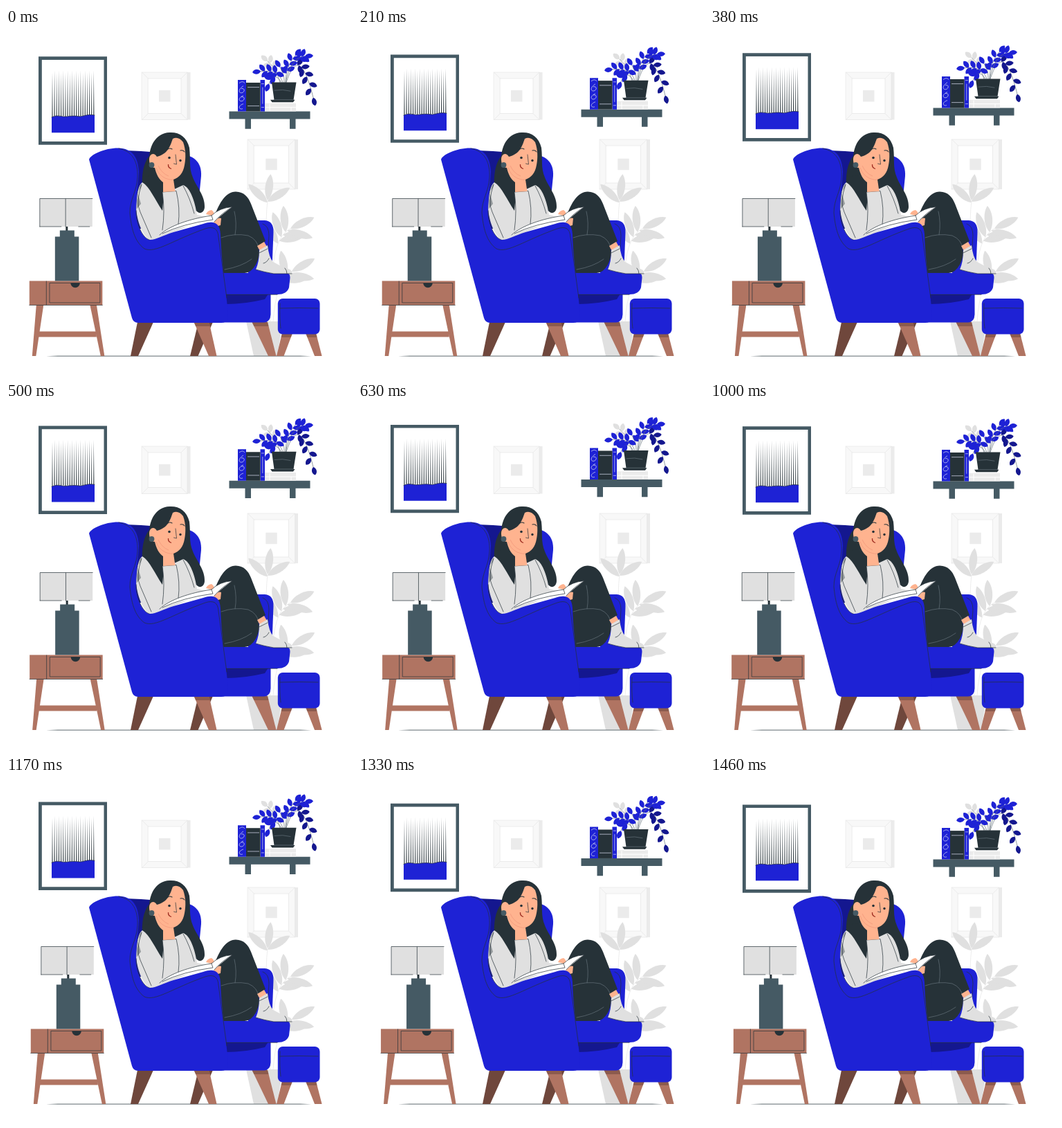
An HTML page for the animation above (1500 ms loop, 500 by 500 pixels).

```html
<!DOCTYPE html>
<html lang="en">
<head>
<meta charset="utf-8">
<title>Reading corner</title>
<style>
  html, body { margin: 0; height: 100%; overflow: hidden; background: #fff; }
  svg { display: block; width: 100vw; height: 100vh; }
  .blue { fill: #1e22d5; } .navy { fill: #14178f; }
  .dark { fill: #263238; } .slate { fill: #455a64; }
  .wood { fill: #b07462; } .shade { fill: #6f473c; }
  .skin { fill: #ffb38f; } .gray { fill: #e0e0e0; }
  .pale { fill: #f8f8f8; } .mist { fill: #ebebeb; } .white { fill: #fff; }
  .line, .soft, .trim { fill: none; stroke: #263238; stroke-width: .7; stroke-linecap: round; stroke-linejoin: round; }
  .soft { stroke: #e6e6e6; } .trim { stroke: #65727a; }
</style>
</head>
<body>
<svg viewBox="0 0 500 500">
  <g id="wall"></g>
  <g id="floorPlant"></g>
  <path class="gray" d="M347 424H400L392 474H358Z"/>
  <path d="M58 474.200L75 473.400H425L441 474.200L425 474.800H75Z" fill="#7d868a"/>

  <g id="table">
    <g id="tableLegs"></g>
    <path class="wood" d="M34 365.500H139.500V400.500H34ZM48 438.500H131V446.500H47Z"/>
    <path class="line" d="M34 400.500H139.500M58.500 366V400M63.500 368.500H136V397H63.500Z"/>
    <path class="dark" d="M93.500 368.500H107A6.700 6.700 0 0 1 93.500 368.500ZM86.500 286H89.500V294H86.500Z"/>
    <path class="slate" d="M78 292.500H99V301.500H105.500V365.500H71V301.500H78Z"/>
    <path class="gray" d="M49 246.500H125V287H49Z"/>
    <path class="line" d="M49 287V246.500H125M86.300 247V287M49 287H80M105 287H121"/>
  </g>

  <!-- framed print -->
  <g class="float">
    <path class="slate" d="M47 41.600H146V169H47Z"/>
    <path class="white" d="M51.800 46.300H141.500V164.300H51.800Z"/>
    <path id="rain" class="dark"/>
    <path class="blue" d="M66 129.300C74 125 80 129 87 128.300S99 127 105 128S117 124 128 126.300V151.500H66Z"/>
    <path class="line" d="M66 129.300C74 125 80 129 87 128.300S99 127 105 128S117 124 128 126.300"/>
  </g>

  <!-- shelf -->
  <g class="float">
    <path class="slate" d="M322.500 120.800H439.500V131.800H322.500ZM345.500 131H354V146H345.500ZM410 131H418.500V146H410Z"/>
    <path class="blue" d="M335 75.300H347V120.800H335ZM367.500 75.300H374V120.800H367.500Z"/>
    <path class="dark" d="M347 79.300H367.500V120.800H347Z"/>
    <path d="M337 80Q342 76 345 80M343 84C334 90 337 95 341 94S346 87 340 88M343 98C334 102 337 107 341 106S346 99 340 100M343 110C334 113 337 119 342 117M349 86H366M349 113H366M369 81H373M370.800 86V110M369 115H373" fill="none" stroke="#dfe1f5" stroke-width=".7"/>
    <path class="mist" d="M374 109H419V120.800H374Z"/>
    <path d="M375 115H419M381 110V120M412 115V120" fill="none" stroke="#fff"/>
    <g id="shelfPlant"></g>
    <path class="dark" d="M384 78.800H419.500L415.500 104H417.500L415 107.500H384.500L382 104H387.500Z"/>
    <path class="trim" d="M387.500 104H415.500M388 90.500Q400 88.500 411 91.500"/>
  </g>

  <!-- chair, far parts -->
  <g id="chairLegs"></g>
  <path class="navy" d="M172 177C205 178 230 180 245 186V290H186Z"/>
  <path class="blue" d="M245 182C272 182 283 194 282 214L277 264H250Z"/>
  <path class="blue" d="M350 278H374Q387 279 386.500 295L384 360H350Z"/>
  <path class="blue" d="M305 380H382.500V414Q382 425 373 425.500H305Z"/>
  <path class="navy" d="M316 384H379L374 392Q345 399 318 399Z"/>
  <path class="blue" d="M305 354H403Q411 353 410.500 361L409 375Q406 385 392 385H312Z"/>
  <path class="line" d="M318 385.300H392M371 283Q380 286 380 300L378 330"/>

  <!-- reader: hair and sweater -->
  <path class="dark" d="M236 151C218 152 209 167 207 185C198 196 196 212 197 232H258C264 238 270 248 272 258C275 270 286 270 287 259C288 243 275 229 270 216C264 202 267 190 265 173C261 157 250 150 236 151Z"/>
  <path class="gray" d="M197 223C191 227 189 240 188 261C190 285 200 303 210 308L294 274L276 270C273 250 266 230 256 227L243 233Z"/>
  <path class="dark" d="M197 215V223C208 230 215 248 226 264L229 230L222 212Z"/>
  <path class="gray" d="M226 237L246 235.500Q252 258 249 286L226 292Q230 265 226 237Z"/>
  <path d="M190 237Q196 230 196 225Q190 229 188.500 262L195 254Z" fill="#969b9d"/>
  <path class="line" d="M196 226Q187 252 194 266L210 303M226 292Q230 265 226 237L246 235.500Q252 260 249 284M256 228Q266 246 272 268"/>

  <!-- reader: head and hand -->
  <path class="skin" d="M241 160C237 171 234 182 218 186C214 179 207 182 207 190C207 197 210 202 215 202C217 211 221 219 227 223V237L244.500 236L242 219C250 216 256 210 258 198C260 188 260 176 256 165Q249 156 241 160Z"/>
  <path d="M217 202Q220 212 230 217Q240 221 243 218M220 199Q225 210 235 214" fill="none" stroke="#f0967a" stroke-width=".7"/>
  <circle class="slate" cx="210.500" cy="198" r="3.900"/>
  <circle class="dark" cx="236" cy="187.500" r="1.800"/>
  <circle class="dark" cx="252" cy="191.500" r="1.700"/>
  <path class="line" style="stroke-width:1.100" d="M232.500 176Q236 172.500 240 175M252 177Q256 176 258 179"/>
  <path class="line" d="M245 183L246.500 197L242.500 196"/>
  <path d="M234.500 197Q234 202 239 203.500" fill="none" stroke="#a02f23" stroke-width="1.300"/>

  <!-- reader: legs and book -->
  <path class="dark" d="M301 272C309 252 317 237 332 236.500C344 237 350 244 354 254L375 308L364 316Q369 326 361 342Q354 354 345 354H305V290Z"/>
  <path class="trim" d="M330 265Q334 282 331 299M311 303Q330 296 350 300Q364 306 365 319M316 349Q340 345 355 334"/>
  <path class="skin" d="M363 315L373 309L377 316L367 322ZM289 269Q291 264 297 263Q302 266 300 272ZM300 281Q306 273 311 275L310 285L303 287Z"/>
  <path class="gray" d="M366 321L378 314Q380 332 386 338L403 347Q414 348 413.500 355H386Q370 352 361 349Q366 338 366 321Z"/>
  <path class="line" d="M366 325L378 319M380 333Q377 339 372 340M361 349Q374 353 387 355H413M403 347Q406 350 406 355"/>
  <path class="white" d="M222 299C236 286 264 276 297 271Q308 260 327 258.500Q311 270 301 280L290 284Q250 285 222 299Z"/>
  <path class="line" d="M222 299C236 286 264 276 297 271Q308 260 327 258.500Q311 268 301 280M226 297Q255 283 299 277L297 271"/>

  <!-- chair, near side -->
  <path class="blue" d="M120 190C122 183 142 173.500 162 173.500C183 174 191 187 192 208C191 229 188 242 188 264C188 283 197 303 207 306C215 307 226 300 242 295L285 283C300 278 309 281 310 298C311 340 320 390 321 417Q320 426 311 426H191Q184 426 182 419Z"/>
  <path class="line" d="M163 174C184 178 191 195 190 216C189 237 179 247 179 267C181 288 185 308 200 319C216 326 240 307 288 290Q306 284 307 302L319 390M188 264C188 283 197 303 207 306"/>

  <!-- footstool -->
  <g id="stoolLegs"></g>
  <rect class="blue" x="392.800" y="391" width="60.700" height="51.500" rx="7"/>
  <path class="line" d="M396 405Q424 404 451 405M397 434Q395 418 396 398"/>
</svg>
<script>
const $ = id => document.getElementById(id);
const add = (id, markup) => $(id).insertAdjacentHTML('beforeend', markup);
const box = (x, y, w, h) => `M${x} ${y}h${w}v${h}h${-w}Z`;

function wallFrame(x, y, w, h) {
  const inset = 9, hole = 16.5;
  const window = box(x + inset, y + inset, w - 2 * inset, h - 2 * inset);
  add('wall', `<path class="pale" d="${box(x, y, w, h)}"/>
    <path class="mist" d="${box(x + w, y, 4.5, h)}"/>
    <path class="white" d="${window}"/>
    <path class="soft" d="${box(x, y, w, h)}${window}M${x} ${y}l9 9M${x} ${y + h}l9 -9M${x + w} ${y}l-9 9M${x + w} ${y + h}l-9 -9"/>
    <path class="mist" d="${box(x + (w - hole) / 2, y + (h - hole) / 2, hole, hole)}"/>`);
}

// A tapering leg from y down to the floor, leaning sideways.
function leg(id, color, x, y, width, lean, foot) {
  add(id, `<path class="${color}" d="M${x} ${y}h${width}L${x + lean + foot} 474h${-foot}Z"/>`);
  if (color === 'wood' && id !== 'tableLegs') {
    const k = 6 / (474 - y);
    add(id, `<path class="shade" opacity=".55" d="M${x} ${y}h${width}l${k * (lean + foot - width)} 6L${x + k * lean} ${y + 6}Z"/>`);
  }
}

// A quadratic stem with pairs of leaves from t = first up, and one leaf at its end.
function sprig(id, color, [x0, y0, cx, cy, x1, y1], pairs, size, first, width, stem) {
  const mix = (a, b, c, t) => (1 - t) ** 2 * a + 2 * t * (1 - t) * b + t * t * c;
  const slope = (a, b, c, t) => (1 - t) * (b - a) + t * (c - b);
  const w = size * width;
  const leaf = (t, turn) => {
    const angle = Math.atan2(slope(y0, cy, y1, t), slope(x0, cx, x1, t)) * 180 / Math.PI + turn;
    return `<path class="${color}" transform="translate(${mix(x0, cx, x1, t)} ${mix(y0, cy, y1, t)}) rotate(${angle})"
      d="M0 0C${size * .25} ${-w} ${size * .75} ${-w} ${size} 0C${size * .75} ${w} ${size * .25} ${w} 0 0"/>`;
  };
  let markup = `<path class="${stem}" d="M${x0} ${y0}Q${cx} ${cy} ${x1} ${y1}"/>` + leaf(1, 0);
  for (let i = 0; i < pairs; i++) {
    const t = first + (1 - first) * i / pairs;
    markup += leaf(t, -52) + leaf(t + .4 * (1 - first) / pairs, 52);
  }
  add(id, markup);
}

wallFrame(196.5, 64, 65.5, 68.5);
wallFrame(349.5, 161, 68, 72);

const floorSprig = (stem, pairs, first) => sprig('floorPlant', 'gray', stem, pairs, 38, first, .2, 'soft');
floorSprig([382, 424, 372, 300, 378, 249], 1, .97);
floorSprig([386, 345, 390, 300, 411, 290], 3, .45);
floorSprig([386, 424, 390, 365, 413, 352], 2, .6);

const shelfSprig = (color, stem, pairs, first) => sprig('shelfPlant', color, stem, pairs, 12, first, .38, 'trim');
shelfSprig('gray', [396, 79, 390, 58, 378, 48], 2, .5);
shelfSprig('navy', [405, 79, 424, 20, 444, 101], 4, .42);
shelfSprig('blue', [404, 79, 404, 56, 418, 40], 3, .3);
shelfSprig('blue', [404, 79, 412, 42, 432, 41], 2, .75);
shelfSprig('blue', [400, 79, 394, 60, 368, 63], 3, .4);
shelfSprig('blue', [398, 79, 388, 62, 380, 81], 1, .5);
shelfSprig('blue', [402, 79, 403, 68, 396, 57], 1, .4);

leg('tableLegs', 'wood', 44, 400, 10.5, -6, 5.5);
leg('tableLegs', 'wood', 121.5, 400, 9.5, 15.5, 5.5);
leg('chairLegs', 'shade', 190, 425, 23, -10, 11);
leg('chairLegs', 'shade', 278, 425, 21, -12, 11.5);
leg('chairLegs', 'wood', 271.5, 425, 22, 21.5, 11.5);
leg('chairLegs', 'wood', 355.5, 425, 22.5, 23.5, 11.5);
leg('stoolLegs', 'wood', 399, 441, 15, -8, 10.5);
leg('stoolLegs', 'wood', 433, 441, 15, 13, 10.5);

// Thin wedges with alternating tops.
let rain = '';
for (let i = 0; i < 20; i++) {
  rain += `M${67 + i * 3.15} ${i % 2 ? 61.5 : 65}l.6 66h-1.2Z`;
}
$('rain').setAttribute('d', rain);

const DURATION = 1500, FRAMES = 36, PHASE = 28;
const shake = [0, -1, 2, -4, 4, -4, 4, -4, 2, -1, 0];

function draw(now) {
  const frame = Math.floor((now + 4) * FRAMES / DURATION) % FRAMES;
  const p = frame / FRAMES + PHASE / DURATION;
  const i = Math.floor(p * 10);
  const x = shake[i] + (shake[i + 1] - shake[i]) * (p * 10 - i);
  const y = -10 * (1 - Math.abs(1 - 2 * p));
  document.querySelectorAll('.float').forEach(g => g.setAttribute('transform', `translate(0 ${y})`));
  $('table').setAttribute('transform', `translate(${x} 0)`);
}

let start;
function tick(now) {
  start ??= now;
  draw(now - start);
  requestAnimationFrame(tick);
}
draw(0);
requestAnimationFrame(tick);
</script>
</body>
</html>
```
